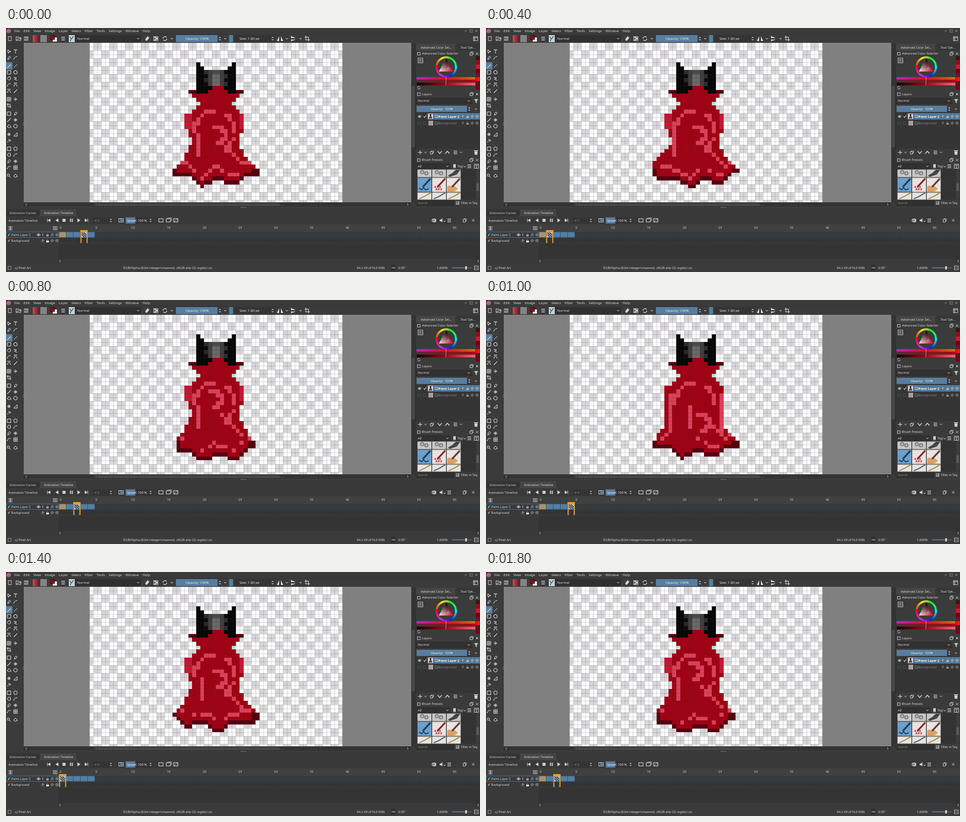
An HTML page for the animation above (2000 ms loop, 800 px wide and 413 px high).

```html
<!DOCTYPE html>
<html lang="en">
<head>
<meta charset="utf-8">
<title>Pixel art dress</title>
<style>
html, body { margin: 0; width: 100%; height: 100%; overflow: hidden; background: #3b3b3b; }
svg { display: block; width: 100vw; height: 100vh; font-family: "Noto Sans", "Open Sans", sans-serif; }
text { white-space: pre; }
</style>
</head>
<body>
<svg id="stage" viewBox="0 0 800 413"></svg>
<script>
const INK = '#d6d6d6', DIM = '#858585', BASE = '#3b3b3b', DARK = '#303030', BLUE = '#587e9f', ORANGE = '#e39a3b';
const CELL = 20 / 3, X0 = 141, Y0 = 58, TOP = Y0 - 5 * CELL;
let out = '';
const rect = (x, y, w, h, fill, extra = '') =>
  out += `<rect x="${x}" y="${y}" width="${w}" height="${h}" fill="${fill}" ${extra}/>`;
const box = (x, y, w, h = w, stroke = INK, sw = .8) =>
  rect(x, y, w, h, 'none', `stroke="${stroke}" stroke-width="${sw}"`);
const line = (d, stroke = INK, sw = .9, extra = '') =>
  out += `<path d="${d}" fill="none" stroke="${stroke}" stroke-width="${sw}" ${extra}/>`;
const fill = (d, color = INK) => out += `<path d="${d}" fill="${color}"/>`;
const dot = (x, y, r, color = INK) => out += `<circle cx="${x}" cy="${y}" r="${r}" fill="${color}"/>`;
const ring = (x, y, r, color = INK, sw = .9) =>
  out += `<circle cx="${x}" cy="${y}" r="${r}" fill="none" stroke="${color}" stroke-width="${sw}"/>`;
const text = (x, y, s, size = 5.4, color = INK, extra = '') =>
  out += `<text x="${x}" y="${y + size * .36}" font-size="${size}" fill="${color}" ${extra}>${s}</text>`;
const repeat = (n, f) => { for (let i = 0; i < n; i++) f(i); };
const at = (x, y) => `transform="translate(${x} ${y})"`;
const down = (x, y) => line('M-2 -1L0 1L2 -1', INK, .9, at(x, y));
const cross = (x, y) => line('M-2 -2L2 2M2 -2L-2 2', INK, .9, at(x, y));
const plus = (x, y) => line('M-3.5 0h7M0 -3.5v7', INK, 1, at(x, y));
const bars = (x, y) => line('M-3 -2.4h6M-3 0h6M-3 2.4h6', INK, 1, at(x, y));
const windows = (x, y) => { box(x - 2.5, y - 1.5, 4); line('M-1 -1.5v-1.5h4v4h-1.5', INK, .7, at(x, y)); };
const spin = (x, y) => fill(`M${x - 2} ${y - 1}h4l-2 -2.4zM${x - 2} ${y + 1}h4l-2 2.4z`, '#aaa');
const slider = (x, y, w, h, part, s, dx) => {
  rect(x, y, w, h, '#343434'); rect(x, y, w * part, h, BLUE);
  text(x + dx, y + h / 2, s, h > 11 ? 5.9 : 5.4, '#eee');
};
const combo = (x, y, w, s) => { rect(x, y - 5.5, w, 11, DARK); text(x + 3, y, s, 5.4); down(x + w - 5, y); };

const gradient = (id, ...colors) => `<linearGradient id="${id}">${colors.map((c, i) =>
  `<stop offset="${i / (colors.length - 1)}" stop-color="${c}"/>`).join('')}</linearGradient>`;
out += `<defs>
<pattern id="checks" patternUnits="userSpaceOnUse" x="${X0 - CELL}" y="${TOP}" width="${4 * CELL}" height="${4 * CELL}">
<path d="M0 0h${4 * CELL}v${4 * CELL}H0z" fill="#fff"/>
<path d="M${2 * CELL} 0h${2 * CELL}v${2 * CELL}h${-4 * CELL}v${2 * CELL}h${2 * CELL}z" fill="#d9d7d9"/></pattern>
<pattern id="grid" patternUnits="userSpaceOnUse" x="${X0}" y="${TOP}" width="${CELL}" height="${CELL}">
<path d="M0 .3H${CELL}M.3 0V${CELL}" stroke="#302838" stroke-opacity=".36" stroke-width=".6"/></pattern>
<linearGradient id="value" x2="0" y2="1"><stop/><stop offset="1" stop-opacity="0"/></linearGradient>
${gradient('reds', '#e04058', '#6a1820')}${gradient('hues', '#c022b4', '#d01030', '#d06a20')}
${gradient('shade', '#100', '#a50014', '#e86a78')}${gradient('sat', '#4b3034', '#b00014')}${gradient('tint', '#fff', '#e00020')}
</defs>`;

// Menu and toolbar
rect(0, 0, 800, 413, BASE);
dot(4.5, 5, 3.6, '#c05a90');
const MENUS = 'File Edit View Image Layer Select Filter Tools Settings Window Help'.split(' ');
text(14, 5, MENUS.map((s, i) => `<tspan dx="${i ? 6.1 : 0}">${s}</tspan>`).join(''), 5.9);
line('M774 5h4', DIM); box(783, 3, 4, 4, DIM); line('M792 3l4 4m0 -4l-4 4', DIM);
line('M0 10.5H800', '#333', .6);
box(4, 14.5, 5, 7); line('M17 21v-6h3l1 1h4v5zM18 21l2 -3h6'); box(31, 15, 6); line('M33 15v2h3v-2M33 21v-2h3');
line('M41 13v10M72 13v10M91 13v10M230 13v10', '#555', .6);
rect(45, 12, 11, 12, 'url(#reds)'); rect(58, 12, 11, 12, DIM);
rect(79, 16, 7, 7, '#eee'); rect(75, 12.5, 7, 7, '#a50010', 'stroke="#111" stroke-width=".7"');
bars(96.5, 18);
rect(106, 12, 10, 12, '#c5d0d8'); line('M108 22l6 -8M108 15l2 3', '#345', 1.2);
rect(117, 12, 111, 12, DARK); text(120, 18, 'Normal', 5.9); down(223, 18);
fill('M235 19l4 -5l3 2.5l-4 5h-2z');
box(249.5, 14.5, 7); line('M250 16h3v3h4M250 20h3v-5M254 17h2', INK, 1.6);
line('M265 18a3.4 3.4 0 0 1 6 -2.2M271.5 18a3.4 3.4 0 0 1 -6 2.2', INK, 1.2);
slider(287, 12, 70, 12, 1, 'Opacity: 100%', 16); slider(376.5, 12, 76, 12, .09, 'Size: 1.00 px', 17.5);
spin(361, 18); spin(450, 18);
[280, 370, 474, 497].forEach(x => down(x, 18));
fill('M461 14v8h-4zM464 14v8h4zM481 17h8l-8 -3.5zM481 19.5h8l-8 3z');
line('M506 13v7h7M504 15.5h6.5v7', INK, 1.1);
box(789, 14.5, 7); line('M789 16.5h7M791 16v5');

// Canvas view
rect(30, 25, 654, 270, '#808080');
rect(X0, 25, 64 * CELL, 270, 'url(#checks)');
out += '<g id="dress" shape-rendering="crispEdges"></g>';
rect(X0, 25, 64 * CELL, 270, 'url(#grid)');
rect(30, 295, 654, 7, '#343434'); rect(150, 296.5, 312, 4.5, '#484848');
rect(684, 25, 7, 270, '#343434'); rect(685.2, 98, 4.6, 104, '#484848');
line('M35 297l-2 1.7l2 1.7M677 297l2 1.7l-2 1.7', INK, .7);
line('M396 303.6h9M29 160v6', '#aaa', .8, 'stroke-dasharray="1 1"');

// Tool box
const GLYPHS = {
  arrow: 'M-2 -3L3 0L0 1L-1 3z', type: 'M-3 -3H3M0 -3V3', pen: 'M-2 3L-1 -1L1 -3L3 -1L1 1z', line: 'M-3 3L3 -3',
  brush: 'M-3 3L0 1L3 -3L1 -1z', box: 'M-3 -3H3V3H-3z', oval: 'M-3 0a3 3 0 1 0 6 0a3 3 0 1 0 -6 0',
  poly: 'M-3 0L-1 -3H2L3 1L0 3z', zig: 'M-3 -2L2 -1L-2 1L3 3', curve: 'M-3 3Q-2 -3 3 -2', path: 'M-3 3Q0 -6 3 3M-3 -3H3',
  grid: 'M-3 -3H3V3H-3zM-3 0H3M0 -3V3', plus: 'M-3 0H3M0 -3V3', crop: 'M-2 -4V2H4M-4 -2H2V4',
  star: 'M-3 0H3M0 -3V3M-2 -2L2 2M2 -2L-2 2', fill: 'M-3 1L0 -3L3 0L0 3zM3 1V3', rule: 'M-3 3L3 -3M-3 3H3V-2',
  pin: 'M-3 3L0 0M-1 -2L2 1M0 -3L3 0L1 1', zoom: 'M-3 -1a2 2 0 1 0 4 0a2 2 0 1 0 -4 0M1 1L3 3', none: ''
};
const GROUPS = ['arrow type pen curve', 'brush line box oval poly zig curve path path brush', 'grid plus crop none',
  'box pen brush star fill oval', 'star rule pin none', 'box oval poly curve pen star curve grid', 'zoom fill'];
rect(0, 58, 11, 12, BLUE);
let toolY = 40;
GROUPS.forEach(g => {
  g.split(' ').forEach((name, i) => {
    line(GLYPHS[name], INK, 1, at(i % 2 ? 16 : 5, toolY));
    if (i % 2) toolY += 10.6;
  });
  line(`M1 ${toolY - 3.6}H22`, '#4a4a4a', .6);
  toolY += 3.2;
});

// Colour selector
const header = (y, s) => {
  box(694.5, y - 2.2, 4.5, 4.5, INK, .7); text(702, y, s); windows(785.5, y); cross(795, y);
};
rect(691, 25, 109, 278, BASE); line('M691.5 25V303', DARK, 1);
rect(692, 27, 66, 11, '#454545'); rect(761, 27, 39, 11, '#353535');
text(700, 33, 'Advanced Color Sel...', 5.3); text(767, 33, 'Tool Opt...', 5.3);
header(43.5, 'Advanced Color Selector');
box(695.5, 51, 8); line('M697 53.5h5M697 55h5M697 56.8h5', INK, .6);
for (let a = 0; a < 360; a += 6) {
  line('M0 -16.4h2', `hsl(${90 + a} 90% 52%)`, 3.2, `transform="translate(743 66) rotate(${a})"`);
}
['tint', 'value'].forEach(id => fill('M743 51.5L755.5 73.5H730.5z', `url(#${id})`));
ring(746.5, 68.5, 1.4, '#eee', .5);
['hues', 'sat', 'shade'].forEach((id, i) => rect(693, 83 + i * 4.8, 99, 4.5, `url(#${id})`));
line('M742.5 82.5V97.5', '#e8e8e8', .5);
repeat(7, i => rect(793, 55 + i * 7, 7, 7, `hsl(352 85% ${32 + 16 * Math.sin(i * 2)}%)`));
rect(793, 48, 6, 6, '#111'); ring(796, 51, 2, '#d00020', .8);
line('M694.4 101a2.3 2.3 0 0 1 4 -1.5M699 101a2.3 2.3 0 0 1 -4 1.5');

// Layers
const eye = (x, y) => { line('M-3 0q3 -3.6 6 0q-3 3.6 -6 0z', '#fff', .7, at(x, y)); dot(x, y, 1, '#fff'); };
const badges = (x, y, c) => {
  line('M0 -2v4M-1.2 -1h2.4', c, .9, at(x, y));
  fill(`M${x + 6} ${y}h4v2.5h-4z`, c); line('M-1.2 0v-1.2q1.2 -1.6 2.4 0v1', c, .6, at(x + 8, y));
  ring(x + 16, y, 2, c, .7); line('M-1 1.8l2 -3.5', c, .7, at(x + 16, y));
  ring(x + 24, y, 2.2, c, .7); line('M-2 0h4M0 -2v4', c, .5, at(x + 24, y));
};
const group = (x, y, c) => { box(x, y - 2, 3.5, 4, c, .6); line('M2 2h3v-4', c, .6, at(x, y)); };
header(112, 'Layers');
combo(692, 123.5, 94, 'Normal'); fill('M790 120.5h7l-2.6 3v3.5l-1.8 -1v-2.5z');
slider(693, 131.5, 85, 10.5, 1, 'Opacity:  100%', 24); spin(782, 137); down(793, 137);
rect(692, 143.5, 108, 61, '#353535'); rect(711.5, 144, 88.5, 11, '#50789a');
eye(698, 149.7); line('M705 149.7l1.6 1.8l2.6 -3.8', '#fff', 1);
rect(712.5, 145.5, 8, 8, '#e8e0e0'); rect(715, 146, 3, 2.2, '#111'); fill('M715.4 148.2h2.2l1.6 4.8h-5.4z', '#a50010');
group(724, 149.5, '#ddd'); text(730, 149.7, 'Paint Layer 2', 5.4, '#fff', 'font-weight="700"'); badges(771, 149.7, '#b8c8d6');
box(695.5, 158.8, 4.5, 4, '#555', .6); box(704.5, 158.8, 4.5, 4, '#555', .6);
rect(713, 157, 8, 8, '#a0a0a0'); group(724, 161, DIM); text(730, 161, 'Background', 5.4, DIM); badges(771, 161, '#999');
plus(699, 210.5); down(708, 210.5); windows(718.5, 211);
line('M-3.5 -2L0 2L3.5 -2', INK, 1.2, at(732, 210.5)); line('M-3.5 2L0 -2L3.5 2', INK, 1.2, at(745, 210.5));
bars(758.5, 210.5); down(768, 210.5);
fill('M790.5 208.5h5.5l-.6 6h-4.3zM789.8 207h7v.9h-7z');

// Brush presets
header(223.5, 'Brush Presets');
combo(692, 234, 58, 'All');
fill('M755 230.5h4v7l-2 -1.8l-2 1.8z'); text(762, 234, 'Tag', 5.2); down(774, 234.5);
bars(782, 234); box(790.5, 230.5, 7); line('M792 232.5h4M794 233v4');
rect(692, 239.5, 108, 51, '#333');
const STROKES = ['#20384e', '#8a2024', '#60302c'];
repeat(3, c => {
  const x = 694.5 + c * 24.7;
  rect(x, 239.5, 23.5, 13, '#c9c7c6'); rect(x, 253.5, 23.5, 24, c ? '#e6e3e1' : '#6aa0cc'); rect(x, 278.5, 23.5, 12, '#e6e3e1');
  if (c < 2) repeat(2, i => ring(x + 8 + i * 7, 244 + i * 2, 2.6, '#808080', 2));
  else fill(`M${x + 2} 250l8 -5l5 -5h8l-6 8l-12 4z`, '#444');
  if (c === 1) line(`M${x + 4} 269h12M${x + 6} 273h11`, '#d84048', 3, 'stroke-dasharray="2.5 1.5"');
  if (c === 2) fill(`M${x + 1} 277v-9q12 -3 17 4q-3 5 -7 5z`, '#d9a066');
  if (c === 0) line(`M${x + 3} 271l4 3l3 -4l4 4l5 -2`, '#183a60', 1.6);
  line(`M${x + 9} 269l13 -14`, STROKES[c], 2.8);
  line(`M${x + 3} 289l9 -4l10 -6`, c === 1 ? '#555' : '#bc8432', 1.8);
});
rect(793, 240, 6, 50, '#3c3c3c'); rect(794, 263, 4, 13, '#5a5a5a');
rect(693, 291.5, 64, 10, DARK); text(695, 296.5, 'Search', 5.2, DIM);
box(760, 294, 4.5); line('M760.5 296l1.6 1.8l3 -4'); text(768, 296.5, 'Filter in Tag', 5.1);

// Timeline dock
rect(0, 305, 800, 95, '#393939'); rect(0, 307, 57, 11.5, '#343434'); rect(57.5, 307, 61, 11.5, '#464646');
text(6, 313, 'Animation Curves', 5.4, '#c4c4c4'); text(64, 313, 'Animation Timeline');
text(4, 326, 'Animation Timeline');
const tri = (x, s, bar) => {
  fill(`M${x - 2 * s} 322.5l${4.5 * s} 3l${-4.5 * s} 3z`);
  line(`M${x + bar * s} 322.5v6`);
};
tri(73, -1, 3); tri(86, -1, -2); tri(123, 1, -2); tri(135, 1, 3);
rect(95.5, 323, 5, 5, INK); line('M108.8 322.7v5.6M111.8 322.7v5.6', INK, 1.7);
rect(147, 320.5, 33, 10.5, '#343434'); spin(177, 325.7);
text(149.5, 325.8, '# <tspan id="count">0</tspan>', 5.4, DIM);
box(190.5, 322.5, 7.5, 6); line('M194.2 323.5v4M192.5 325.5l1.5 -1.5M196 324v3');
slider(202, 320.5, 46, 10.5, .35, 'Speed: 100 %', 2); spin(244, 325.7);
repeat(3, i => box(258 + i * 12.5, 322.8, 7, 5.4, INK, 1));
line('M272.5 321.5h7v5.5M284 328l6 -5.5', INK, .7);
ring(723, 325.7, 2.5, INK, 1.2); ring(721, 325.7, 2.5, INK, .7); dot(724, 325.7, 1.3);
fill('M732 324.3h2l2.5 -2.2v7l-2.5 -2.2h-2z'); down(740, 327); bars(748, 325.7);
windows(774, 325.7); cross(788.5, 325.5);

// Timeline tracks
const STEP = 12.06, TX = 89.5;
rect(0, 332.5, 800, 12.5, '#404040'); rect(TX, 345, 711, 46, '#343434'); rect(TX, 345, 711, 9.6, '#343a40');
line('M4 336.5h7M4 339h7M4 341.5h7M7.5 335.5v7', INK, .8);
box(80, 336.5, 6, 5); line('M81.5 339h3M83 336.5v5', INK, .7);
repeat(59, i => line(`M${TX + i * STEP} 345V364.5`, '#3d3d3d', .6));
line('M0 364.5H800', '#414141', .6); line('M92 393l-2 1.7l2 1.7M796 393l2 1.7l-2 1.7', INK, .7);
repeat(12, i => text(TX + 1 + i * 5 * STEP, 337.5, i * 5, 5.6, '#c8c8c8'));
box(.5, 345.2, 88.5, 9.4, '#4d7ea8', .7);
['Paint Layer 2', 'Background'].forEach((s, i) => {
  const y = 350 + i * 10;
  line(`M3.5 ${y + 2}l3 -4`, INK, 1.1); text(9, y, s);
  if (i) box(60, y - 1.8, 4, 3.8, '#777', .6); else eye(55, y);
  badges(62, y, '#aaa');
});
fill('M68 360h4.2v2.7h-4.2z', '#fff');
repeat(5, i => rect(TX + i * STEP + .3, 345.4, STEP - .6, 9, i ? '#4f7fa6' : '#a8946a'));
out += '<g id="cursor">';
rect(TX, 342, STEP, 4, ORANGE); rect(TX + 1.5, 345.6, STEP - 3, 8.6, '#b9cad6');
line(`M${TX + 2} 346l8 8M${TX + 5.5} 346l5 5M${TX + 2} 349.5l4.5 4.5`, '#24364a', 1.5);
line(`M${TX + .9} 342V364M${TX + STEP - .9} 342V364`, ORANGE, 1.9);
out += '</g>';

// Status bar
rect(0, 400, 800, 13, BASE);
box(3.5, 403.5, 5, 5, '#aaa', .7); text(15, 406.5, 'u) Pixel Art', 5.4);
text(198, 406.5, 'RGB/Alpha (8-bit integer/channel)  sRGB-elle-V2-srgbtrc.icc', 5.5);
text(592, 406.5, '64 x 64 (416.0 KiB)', 5.5);
ring(654, 406, 4, '#181818', 1.2); line('M650 406h8', '#ddd', .7); text(662, 406.5, '0.00°', 5.3);
text(727, 406.5, '1,600%', 5.5); line('M753 406h24', BLUE, 1.6); line('M777 406h10', '#666', 1.2); rect(775, 403.2, 3, 5.6, '#ccc');
box(790.5, 403, 6.5, 6); line('M792 406h3.5', INK, .7);

document.getElementById('stage').innerHTML = out;

// Dress, drawn on the pixel grid around a middle column
const RED = '#a50012', LIT = '#df4058', SIDE = '#c21c32', HEM = '#57000d', MID = 31.75;
const lerp = (a, b, f) => a + (b - a) * f;
const along = (keys, r) => {
  const i = Math.max(1, keys.findIndex(k => k[0] >= r));
  const [a, b] = [keys[i - 1], keys[i]];
  return lerp(a[1], b[1], (r - a[0]) / (b[0] - a[0]));
};
const random = seed => () => (seed = seed * 16807 % 2147483647) / 2147483647;

// Half width by row: collar, neck, bust, then waist or straight flare, then skirt
const outline = ({ flare, spread }) => [[8, 6], [10, 4], [13, 7.3], [16, 7.3],
  ...(flare ? [[23, 7.6]] : [[18.5, 6], [20.5, 6], [24, 8]]), [27, spread], [32, spread]];

function headColor(r, c) {
  const d = Math.abs(c - 31.5);
  if (r > 5 && Math.abs(c - 32) <= r - 5) return RED;
  if (d > 5) return r === 7 && d < 7 ? HEM : null;
  if (r < 2 && d < 4.5 - r) return null;
  if (r < 2 || r > 5 || d > 3) return '#060606';
  if (d < 1) return r > 2 ? '#696969' : '#4b4b4b';
  return d < 2 ? '#3f3f3f' : (r + c) % 2 ? '#2d2d2d' : '#0c0c0c';
}

function makePose(p) {
  const cells = new Map(), keys = outline(p), rnd = random(p.seed);
  const put = (r, c, color) => color && cells.set(`${r},${c}`, color);
  const light = (x, y) => cells.get(`${Math.round(y)},${Math.round(x)}`) === RED && put(Math.round(y), Math.round(x), LIT);
  const fold = (x, y, u, v) => {
    const n = Math.max(Math.abs(u - x), Math.abs(v - y));
    for (let i = 0; i <= n; i++) light(lerp(x, u, i / n), lerp(y, v, i / n));
  };
  const arc = (x, y, rx, ry, from, to) => {
    for (let a = from; a <= to; a += 6) light(x + rx * Math.cos(a * Math.PI / 180), y + ry * Math.sin(a * Math.PI / 180));
  };
  const bottom = c => Math.round(p.end + .8 * Math.sin(.8 * (c - p.dip) + Math.PI / 2) - 2.5 * ((c - 31.5) / 11) ** 2);

  for (let r = 0; r < 8; r++) for (let c = 25; c < 39; c++) put(r, c, headColor(r, c));
  for (let r = 8; r < 32; r++) {
    const half = along(keys, r);
    const puff = r > 21 && r < 27 ? p.puff * Math.sin((r - 21) / 6 * Math.PI) : 0;
    for (let c = Math.round(MID - half - puff); c < Math.round(MID + half); c++) {
      const d = Math.abs(c + .5 - MID), low = bottom(c);
      if (r > low) continue;
      const dark = r > 26 && (r === low || d > half - 1.5);
      const side = !p.flare && r > 12 && r < 17 && d > 6;
      put(r, c, dark ? HEM : side ? SIDE : RED);
    }
  }
  // Shoulders, curl, drapes
  arc(31, 17, 5, 5, 185, 275);
  arc(32, 17, 4, 5, 300, 360);
  arc(p.curl[0], p.curl[1], 1.6, 2, 250, 460);
  if (p.flare) {
    fold(25, 15, 25, 24);
    fold(38, 15, 38, 24);
  } else fold(36, 19, 34, 22);
  fold(p.drape, 18, p.drape, 23);
  fold(33, 20, 38, 25);
  // Broken line of light above the hem
  for (let c = 23; c < 41; c++) {
    const wave = Math.round(1.2 * Math.sin(c * .8 + p.seed));
    if (rnd() < .65) light(c, bottom(c) - 2 + Math.min(0, wave));
  }
  const paths = {};
  cells.forEach((color, key) => {
    const [r, c] = key.split(',');
    paths[color] = (paths[color] || '') + `M${X0 + c * CELL} ${Y0 + r * CELL}h${CELL}v${CELL}h${-CELL}z`;
  });
  return Object.entries(paths).map(([color, d]) => `<path d="${d}" fill="${color}"/>`).join('');
}

const still = { spread: 11, end: 30, puff: 0, dip: 36, drape: 28, curl: [32, 18], seed: 11 };
const POSES = [
  { dip: 32, seed: 5 },
  { dip: 30, puff: 1.6, drape: 26, seed: 23 },
  { spread: 10, end: 30.6, drape: 27, curl: [31, 16], seed: 37 },
  { drape: 27 },
  { flare: true, drape: 30, curl: [33, 22], seed: 41 }
].map(p => makePose({ ...still, ...p }));

const dress = document.getElementById('dress');
dress.innerHTML = POSES.map(p => `<g display="none">${p}</g>`).join('');

// [start in ms, pose]
const STEPS = [[0, 3], [200, 4], [400, 1], [700, 2], [1000, 4], [1400, 0], [1500, 1], [1800, 2]];
const LOOP = 2000;
const cursor = document.getElementById('cursor'), count = document.getElementById('count');
let shown = -1;
function draw() {
  const t = performance.now() % LOOP;
  const pose = STEPS.filter(([start]) => start <= t).pop()[1];
  if (pose !== shown) {
    [...dress.children].forEach((g, i) => g.setAttribute('display', i === pose ? 'inline' : 'none'));
    cursor.setAttribute('transform', `translate(${pose * STEP} 0)`);
    count.textContent = pose;
    shown = pose;
  }
  requestAnimationFrame(draw);
}
draw();
</script>
</body>
</html>
```
